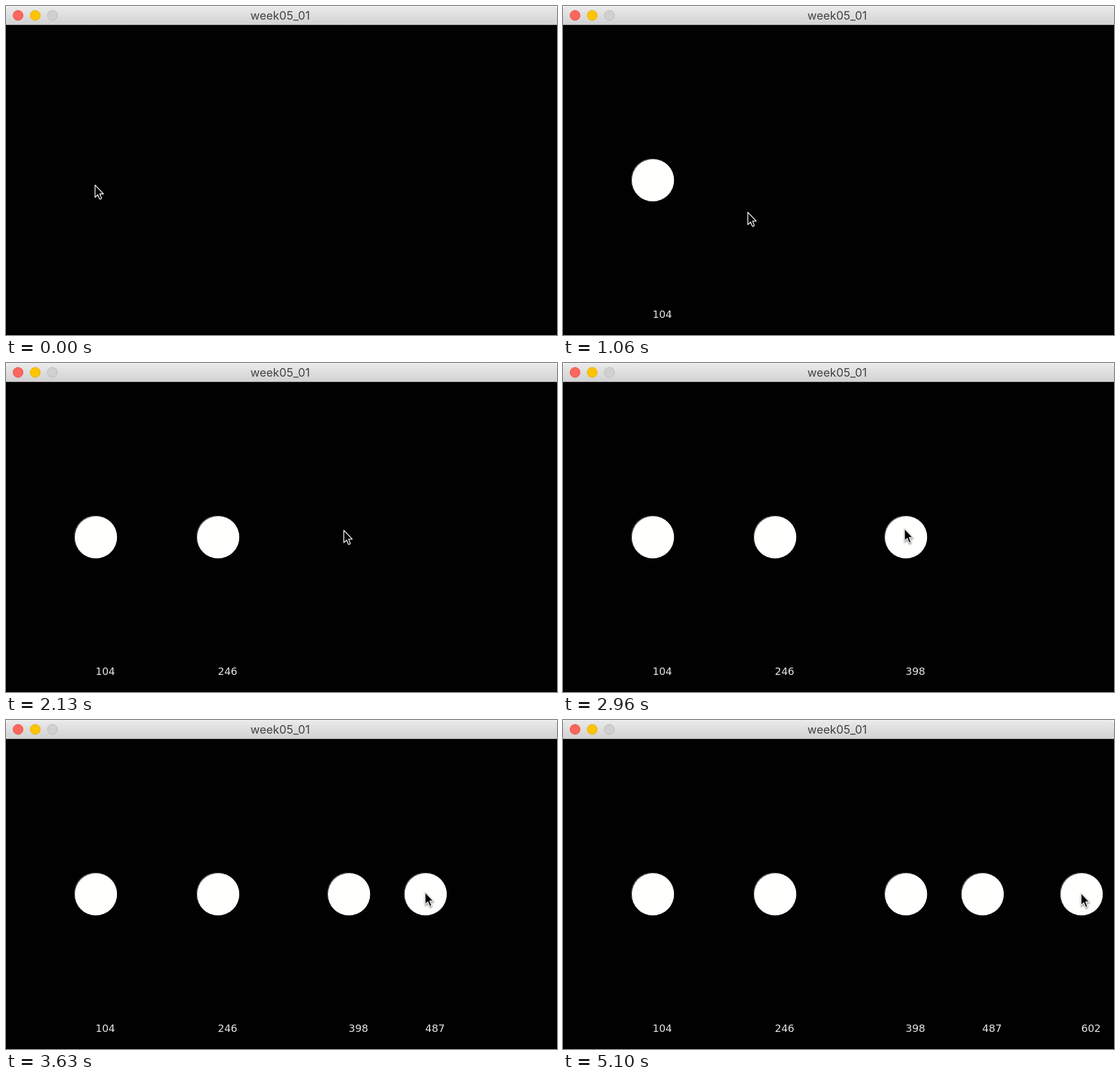
Recreate the animation shown at these times as an HTML page. Size 969 px wide and 578 px high, loop 6330 ms.

```html
<!DOCTYPE html>
<html lang="en">
<head>
<meta charset="utf-8">
<title>week05_01</title>
<style>
  html, body { margin: 0; width: 100%; height: 100%; overflow: hidden; background: #010102; }
  svg { display: block; width: 969px; height: 578px; }
  .title { font: 20.2px Inter, Roboto, sans-serif; fill: #434343; text-anchor: middle; }
  .label { font: 18px "DejaVu Sans", sans-serif; fill: #e4e4e4; }
</style>
</head>
<body>
<svg viewBox="0 0 969 578" xmlns="http://www.w3.org/2000/svg">
  <defs>
    <linearGradient id="bar" x1="0" y1="0" x2="0" y2="1">
      <stop offset="0" stop-color="#ebebeb"/>
      <stop offset="1" stop-color="#d1d1d1"/>
    </linearGradient>
    <filter id="soft" x="-50%" y="-50%" width="200%" height="200%">
      <feGaussianBlur stdDeviation="1.5"/>
    </filter>
    <path id="arrow" d="M0 0V21.7L4.9 17.2L7.9 24.2Q9.4 25.8 11.4 23.2L8.4 15.6H14.8Z"/>
  </defs>

  <rect width="969" height="578" fill="#010102"/>
  <rect width="969" height="10" fill="#fff"/>
  <path d="M0 33.3V6Q0 0 6 0H963Q969 0 969 6V33.3Z" fill="url(#bar)"/>
  <path d="M6 .5H963" stroke="#f4f4f4"/>
  <g id="buttons"></g>
  <text class="title" x="482.2" y="24">week05_01</text>

  <g id="dots"></g>
  <g id="cursor" stroke-linejoin="round">
    <use href="#arrow" x=".5" y="2" fill="#000" stroke="#000" stroke-width="2" opacity=".4" filter="url(#soft)"/>
    <use href="#arrow" fill="#000" stroke="#e2e2e2" stroke-width="1.6"/>
  </g>
</svg>
<script>
const LOOP = 6330;
const SCALE = 969 / 640;
const byId = id => document.getElementById(id);

function add(parent, tag, attrs, text) {
  const el = document.createElementNS("http://www.w3.org/2000/svg", tag);
  for (const key in attrs) el.setAttribute(key, attrs[key]);
  if (text) el.textContent = text;
  parent.appendChild(el);
  return el;
}

[["#fb665e", "#e2504a"], ["#fdc404", "#e2ae08"], ["#d0d0d0", "#b9b9b9"]].forEach(([fill, stroke], i) =>
  add(byId("buttons"), "circle", { cx: 21.2 + 30.2 * i, cy: 16.5, r: 8.8, fill, stroke }));

// Each click leaves a dot labelled with the pointer's x.
const clicks = [[300, 104], [1530, 246], [2530, 398], [3630, 487], [5100, 602]];
const dots = clicks.map(([time, value]) => {
  const x = value * SCALE + 0.5;
  const g = add(byId("dots"), "g", {});
  // The black outline sits off-centre and leaves a thin rim at the upper left.
  add(g, "circle", { cx: x - 0.3, cy: 305.7, r: 37.8, fill: "#fffffd" });
  add(g, "circle", { cx: x + 0.3, cy: 306.3, r: 37.8, fill: "none", stroke: "#010102" });
  add(g, "text", { class: "label", x: x - 0.5, y: 548 }, String(value));
  return { time, g };
});

// Pointer moves: first step, last step, step count, end point.
const start = [156.6, 314.5];
const moves = [
  [830, 1130, 10, 371.5, 375.6],
  [1900, 2160, 9, 602, 291],
  [2960, 2960, 1, 600.5, 291],
  [3000, 3430, 11, 737, 302.5],
  [3860, 3860, 1, 733.5, 303],
  [4000, 4160, 6, 873.7, 308],
  [4430, 4900, 12, 911, 304]
];
const ease = p => p * p * (3 - 2 * p);

function pointer(t) {
  let [x, y] = start;
  for (const [from, to, steps, endX, endY] of moves) {
    if (t < from) break;
    const gap = (to - from) / Math.max(1, steps - 1);
    const done = t >= to ? steps : Math.floor((t - from) / gap + 0.001) + 1;
    const p = ease(done / steps);
    x += (endX - x) * p;
    y += (endY - y) * p;
  }
  return [x, y];
}

function draw(now) {
  const t = now % LOOP;
  for (const { time, g } of dots) g.setAttribute("visibility", t >= time ? "visible" : "hidden");
  const [x, y] = pointer(t);
  byId("cursor").setAttribute("transform", `translate(${x.toFixed(2)} ${y.toFixed(2)})`);
}

let begin;
function tick(now) {
  begin ??= now;
  draw(now - begin);
  requestAnimationFrame(tick);
}
draw(0);
requestAnimationFrame(tick);
</script>
</body>
</html>
```
